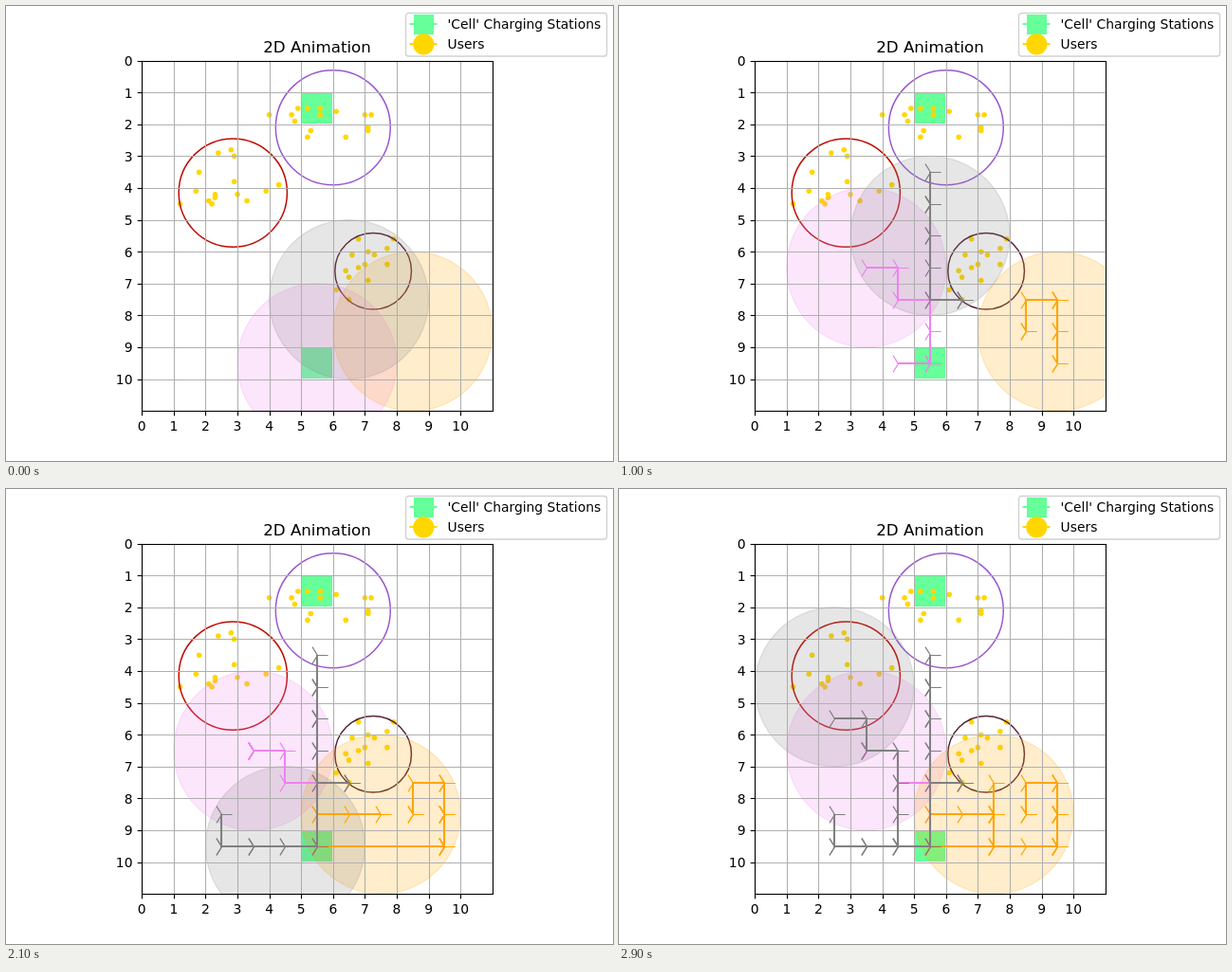
An HTML page with a canvas for the animation above (3 s loop, 640 by 480 pixels).

```html
<!DOCTYPE html>
<html lang="en">
<head>
<meta charset="utf-8">
<title>2D Animation</title>
<style>
  html, body { margin: 0; width: 100%; height: 100%; overflow: hidden; background: #fff; }
  canvas { display: block; }
</style>
</head>
<body>
<canvas id="stage" width="640" height="480"></canvas>
<script>
const ctx = document.getElementById('stage').getContext('2d');
const STEP = 100, STEPS = 30;
const CELL = 33.6, LEFT = 143.2, TOP = 57.6, SIZE = 11;
const GREEN = '#66ff99', GOLD = '#ffd700';
const px = x => LEFT + x * CELL;
const py = y => TOP + y * CELL;
const crisp = v => Math.round(v) + 0.5;

const stations = [[5, 1], [5, 9]];

const clusters = [
  { x: 2.86, y: 4.15, r: 1.7, color: '#c00a00', users: [
    [1.2, 4.5], [1.7, 4.1], [1.8, 3.5], [2.4, 2.9], [2.8, 2.8], [2.9, 3], [2.9, 3.8], [2.3, 4.2],
    [2.3, 4.3], [2.1, 4.4], [2.2, 4.5], [3, 4.2], [3.3, 4.4], [3.9, 4.1], [4.3, 3.9]] },
  { x: 6, y: 2.1, r: 1.8, color: '#9a58d0', users: [
    [4, 1.7], [4.7, 1.7], [4.8, 1.9], [4.9, 1.5], [5.2, 1.5], [5.6, 1.5], [5.6, 1.7], [6.1, 1.6],
    [7, 1.7], [7.2, 1.7], [7.1, 2.1], [7.1, 2.2], [6.4, 2.4], [5.3, 2.2], [5.2, 2.4]] },
  { x: 7.26, y: 6.61, r: 1.2, color: '#562434', users: [
    [6.8, 5.6], [7.9, 5.6], [7.7, 5.9], [7.1, 6], [7.3, 6.1], [6.6, 6.1], [7, 6.4], [6.8, 6.5],
    [7.7, 6.4], [6.4, 6.6], [6.5, 6.8], [7.1, 6.9], [6.1, 7.2], [6.5, 7.5]] }
];

// Moves: up, down, left, right, "." stays, "C" jumps to the lower charging station.
const MOVES = { U: [0, -1], D: [0, 1], L: [-1, 0], R: [1, 0], '.': [0, 0] };

function walk(x, y, moves) {
  const path = [[x, y]];
  for (const move of moves.padEnd(STEPS - 1, '.')) {
    if (move === 'C') [x, y] = [5.5, 9.5];
    else { x += MOVES[move][0]; y += MOVES[move][1]; }
    path.push([x, y]);
  }
  return path;
}

const agents = [
  { color: '#ee82ee', path: walk(5.5, 9.5, 'LRUURLLUL') },
  { color: '#ffa500', path: walk(8.5, 8.5, '.UR..DDUDUDUDUDC.URR.UDDRLUDU') },
  { color: '#808080', path: walk(6.5, 7.5, '.LUUUDUUDDDC.LLLUDR.R.UUULULU') }
];

function line(points, color, width) {
  ctx.beginPath();
  points.forEach(([x, y]) => ctx.lineTo(x, y));
  ctx.strokeStyle = color;
  ctx.lineWidth = width;
  ctx.stroke();
}

function circle(x, y, r) {
  ctx.beginPath();
  ctx.arc(x, y, r, 0, 2 * Math.PI);
}

function dot(x, y, r, color) {
  circle(x, y, r);
  ctx.fillStyle = color;
  ctx.fill();
}

function text(str, x, y, align, size = 13.89) {
  ctx.font = `${size}px "DejaVu Sans", sans-serif`;
  ctx.textAlign = align;
  ctx.fillStyle = '#000';
  ctx.fillText(str, x, y);
}

function drawField() {
  ctx.fillStyle = GREEN;
  for (const [x, y] of stations) ctx.fillRect(Math.round(px(x)), Math.round(py(y)), 33, 33);
  for (const { users } of clusters)
    for (const [x, y] of users) dot(px(x), py(y), 2.8, GOLD);
  for (const { x, y, r, color } of clusters) {
    circle(px(x), py(y), r * CELL);
    ctx.strokeStyle = color;
    ctx.lineWidth = 1.5;
    ctx.stroke();
  }
}

function drawRange({ color, path }, step) {
  const [x, y] = path[step];
  ctx.globalAlpha = 0.2;
  dot(px(x), py(y), 2.5 * CELL, color);
  ctx.strokeStyle = color;
  ctx.lineWidth = 1.39;
  ctx.stroke();
  ctx.globalAlpha = 1;
}

function drawGrid() {
  for (let i = 0; i < SIZE; i++) {
    const x = crisp(px(i)), y = crisp(py(i));
    line([[x, TOP], [x, py(SIZE)]], '#b0b0b0', 1.11);
    line([[LEFT, y], [px(SIZE), y]], '#b0b0b0', 1.11);
  }
}

function drawTrail({ color, path }, step) {
  const points = path.slice(0, step).map(([x, y]) => [Math.round(px(x)), Math.round(py(y))]);
  line(points, color, 2.08);
  for (const [x, y] of points) {
    const mx = x + 0.5, my = y + 0.5;
    ctx.beginPath();
    for (const [dx, dy] of [[11.1, 0], [-5.55, 8.9], [-5.55, -8.9]]) {
      ctx.moveTo(mx, my);
      ctx.lineTo(mx + dx, my + dy);
    }
    ctx.lineWidth = 1.2;
    ctx.stroke();
  }
}

function drawAxes() {
  const x0 = crisp(LEFT), y0 = crisp(TOP), x1 = crisp(px(SIZE)), y1 = crisp(py(SIZE));
  ctx.strokeStyle = '#000';
  ctx.lineWidth = 1.11;
  ctx.strokeRect(x0, y0, x1 - x0, y1 - y0);
  for (let i = 0; i < SIZE; i++) {
    const x = crisp(px(i)), y = crisp(py(i));
    line([[x, y1], [x, y1 + 4.86]], '#000', 1.11);
    line([[x0, y], [x0 - 4.86, y]], '#000', 1.11);
    text(i, px(i), 448, 'center');
    text(i, 133.5, py(i) + 5.4, 'right');
  }
  text('2D Animation', 328, 49.3, 'center', 16.67);
}

function drawLegend() {
  ctx.beginPath();
  ctx.roundRect(421.5, 7.5, 212, 45.5, 3);
  ctx.fillStyle = 'rgba(255,255,255,0.8)';
  ctx.fill();
  ctx.strokeStyle = '#d1d1d1';
  ctx.lineWidth = 1.39;
  ctx.stroke();
  line([[425.5, 19], [454.5, 19]], GREEN, 2);
  ctx.fillStyle = GREEN;
  ctx.fillRect(430, 9, 21, 21);
  line([[425.5, 40], [454.5, 40]], GOLD, 2);
  dot(440.3, 40.3, 11.1, GOLD);
  text("'Cell' Charging Stations", 465.5, 23.5, 'left');
  text('Users', 465.5, 44.5, 'left');
}

function draw(step) {
  ctx.fillStyle = '#fff';
  ctx.fillRect(0, 0, 640, 480);
  ctx.save();
  ctx.beginPath();
  ctx.rect(LEFT, TOP, SIZE * CELL, SIZE * CELL);
  ctx.clip();
  drawField();
  agents.forEach(agent => drawRange(agent, step));
  drawGrid();
  agents.forEach(agent => drawTrail(agent, step));
  ctx.restore();
  drawAxes();
  drawLegend();
}

const start = performance.now();
function tick() {
  draw(Math.floor((performance.now() - start) / STEP) % STEPS);
  requestAnimationFrame(tick);
}
tick();
</script>
</body>
</html>
```
